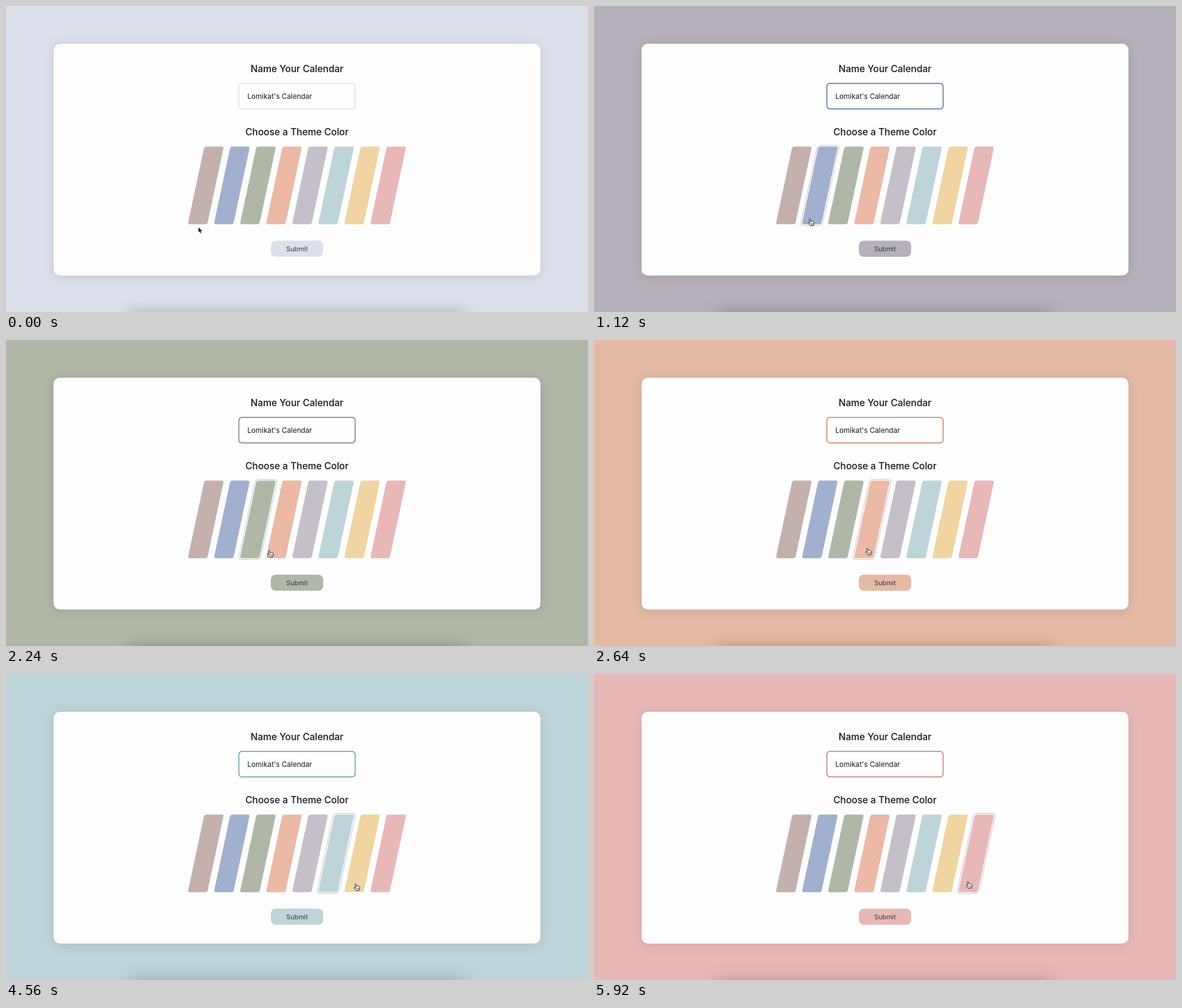
Animation of 956x504 px, one loop 6000 ms. Source, as an HTML page:

```html
<!DOCTYPE html>
<html lang="en">
<head>
<meta charset="utf-8">
<title>Calendar theme picker</title>
<style>
  html, body { margin: 0; width: 100%; height: 100%; overflow: hidden; }
  #stage { position: relative; width: 956px; height: 504px; overflow: hidden; }
  #card, #below { position: absolute; }
  #card {
    left: 78px; top: 62px; width: 800px; height: 382px; border-radius: 10px;
    background: #fdfdfd;
    box-shadow: 0 0 1px rgba(0,0,0,.35), 0 2px 20px rgba(0,0,0,.1);
  }
  #below {
    left: 203px; top: 510px; width: 550px; height: 60px;
    box-shadow: 0 0 30px rgba(0,0,0,.35);
  }
  svg { position: absolute; left: 0; top: 0; display: block; }
  text { font-family: Inter, "Open Sans", sans-serif; fill: #15161c; }
  .title { font-size: 15.5px; font-weight: 500; text-anchor: middle; }
  .value { font-size: 11.7px; }
  .label { font-size: 10.8px; text-anchor: middle; fill: #333a48; }
</style>
</head>
<body>
<div id="stage">
  <div id="below"></div>
  <div id="card"></div>
  <svg width="956" height="504" viewBox="0 0 956 504">
    <text class="title" x="478" y="109">Name Your Calendar</text>
    <rect id="field" x="382.5" y="127.5" width="191" height="42" rx="5" fill="#fefefe" stroke-width="1.4"/>
    <text class="value" x="396.5" y="153">Lomikat's Calendar</text>
    <text class="title" x="478" y="213.3">Choose a Theme Color</text>
    <g id="swatches"></g>
    <rect id="ring" x="-18" y="-66" width="36" height="132" rx="5" fill="#fefefe" stroke="#c6c8cd"/>
    <g id="fills"></g>
    <rect id="button" x="435" y="386.5" width="86" height="26.5" rx="8"/>
    <text class="label" x="478" y="404">Submit</text>
    <path id="arrow" d="M0 0V9.6L2.2 7.6L3.8 11.2L5.4 10.5L3.9 7H6.9Z" fill="#000" stroke="#fff" stroke-width=".7"/>
    <g id="hand" fill="#fff" stroke="#111" stroke-width=".9" stroke-linejoin="round" stroke-linecap="round">
      <path d="M-1 1C-1-.3 .9-.3 1.1 1L1.7 4C2.2 3 3.5 3.1 3.7 4.1C4.3 3.4 5.3 3.6 5.5 4.5C6.5 4.1 7.1 4.8 7 5.7L6.5 8.7L5.7 10.9H.6L-2.4 7.3C-3.2 6.1-2 5.2-1 6.1L-.1 6.9Z"/>
      <path d="M1.8 7V9.2M3.4 7V9.2M5 7V9.2" stroke-width=".6"/>
    </g>
  </svg>
</div>
<script>
const LOOP = 6000, STEP = 80;
const BASE = { fill: '#dbe0ea', border: '#dcdfec' };

// click: moment the theme is chosen
const themes = [
  { fill: '#c4b0ad', border: '#8f706a', click: 380 },
  { fill: '#a0b0ce', border: '#4a6a9f', click: 1074 },
  { fill: '#b0b7a6', border: '#6d7c5e', click: 1770 },
  { fill: '#ebb9a6', border: '#c97a58', click: 2548 },
  { fill: '#c5bfca', border: '#85839a', click: 3140 },
  { fill: '#bdd5d8', border: '#5a9aa0', click: 3612 },
  { fill: '#f0d5a2', border: '#daa545', click: 4600 },
  { fill: '#e8b8b7', border: '#c5786d', click: 5230 }
];

// pointer stops: time, x, y
const path = [
  [0, 316, 364], [320, 321, 353], [520, 323, 352], [1040, 354, 351], [1200, 355, 351],
  [1680, 402, 352], [1880, 403, 351], [2480, 448, 344], [2640, 449, 343], [2760, 450, 343],
  [3040, 493, 347], [3130, 493, 347], [3600, 536, 346], [3840, 536, 346], [4500, 574, 346],
  [4680, 575, 345], [5120, 612, 343], [5320, 611, 342], [5760, 613.5, 342], [5850, 613.5, 342],
  [5920, 614, 342]
];

const $ = id => document.getElementById(id);
const SLOPE = Math.tan(12 * Math.PI / 180), MID_Y = 295.5;
const midX = i => 328.2 + 42.8 * i;
const place = i => `translate(${midX(i)} ${MID_Y}) skewX(-12)`;

$('fills').innerHTML = themes.map((t, i) =>
  `<rect x="-16" y="-64" width="32" height="128" rx="3.5" fill="${t.fill}" transform="${place(i)}"/>`).join('');

function bezier(x, x1, y1, x2, y2) {
  if (x <= 0 || x >= 1) return x <= 0 ? 0 : 1;
  const at = (s, a, b) => 3 * s * (1 - s) ** 2 * a + 3 * s * s * (1 - s) * b + s ** 3;
  let lo = 0, hi = 1;
  for (let k = 0; k < 20; k++) {
    const s = (lo + hi) / 2;
    if (at(s, x1, x2) < x) lo = s; else hi = s;
  }
  return at(lo, y1, y2);
}

const channels = hex => [1, 3, 5].map(k => parseInt(hex.slice(k, k + 2), 16));
function mix(a, b, p) {
  const to = channels(b);
  return `rgb(${channels(a).map((v, k) => Math.round(v + (to[k] - v) * p))})`;
}

function pointerAt(t) {
  const n = path.findIndex(stop => stop[0] > t);
  if (n < 0) return path[path.length - 1].slice(1);
  const [t0, x0, y0] = path[n - 1], [t1, x1, y1] = path[n];
  const u = (t - t0) / (t1 - t0), p = u * u * (3 - 2 * u);
  return [x0 + (x1 - x0) * p, y0 + (y1 - y0) * p];
}

const overSwatch = (x, y) => Math.abs(y - MID_Y) < 64 &&
  themes.some((_, i) => Math.abs(x - midX(i) + (y - MID_Y) * SLOPE) < 16);

function draw(t) {
  const chosen = themes.filter(th => th.click <= t).length - 1;
  const now = themes[chosen] || BASE, before = themes[chosen - 1] || BASE;
  const p = chosen < 0 ? 1 : bezier((t - now.click) / 150, .4, 0, .2, 1);
  const color = mix(before.fill, now.fill, p);

  $('stage').style.background = color;
  $('button').setAttribute('fill', color);
  $('field').setAttribute('stroke', now.border);
  $('ring').setAttribute('visibility', chosen < 0 ? 'hidden' : 'visible');
  $('ring').setAttribute('transform', place(Math.max(chosen, 0)));

  const [x, y] = pointerAt(t), hover = overSwatch(x, y);
  for (const [id, shown] of [['hand', hover], ['arrow', !hover]]) {
    $(id).setAttribute('transform', `translate(${x} ${y})`);
    $(id).setAttribute('visibility', shown ? 'visible' : 'hidden');
  }
}

function tick() {
  const t = performance.now() % LOOP;
  draw(Math.floor(t / STEP) * STEP);
  requestAnimationFrame(tick);
}
tick();
</script>
</body>
</html>
```
